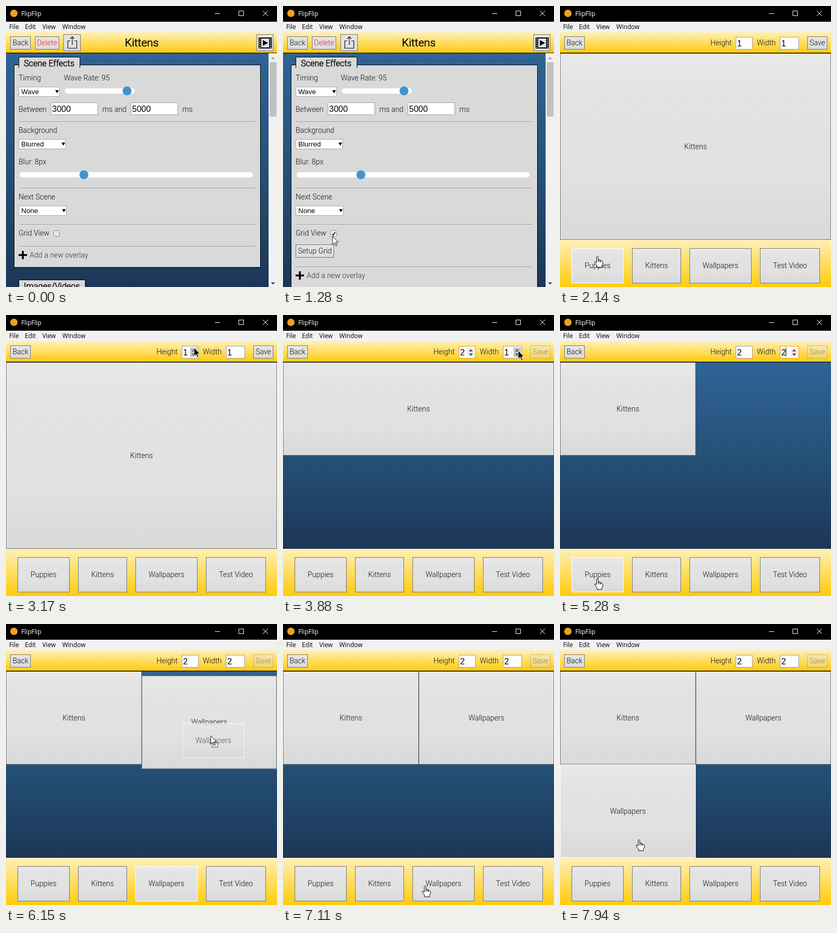
Recreate the animation shown at these times as an HTML page. Size 515 px wide and 536 px high, loop 7.99 s.

```html
<!DOCTYPE html>
<html lang="en">
<head>
<meta charset="utf-8">
<title>FlipFlip</title>
<style>
html, body { margin: 0; width: 100%; height: 100%; overflow: hidden; }
svg { display: block; width: 515px; height: 536px; }
text { font: 300 14px Roboto, sans-serif; white-space: pre; }
.mid { text-anchor: middle; }
.win { font: 11.7px "Open Sans", sans-serif; }
.field { font: 16px "Liberation Sans", sans-serif; }
.select { font: 13.33px "Liberation Sans", sans-serif; }
.tab { font-size: 16px; stroke: #000; stroke-width: .5px; }
.title { font-size: 20.8px; stroke: #000; stroke-width: .6px; }
</style>
</head>
<body>
<svg viewBox="0 0 515 536">
  <defs>
    <linearGradient id="gold" x2="0" y2="1"><stop stop-color="#fff0b8"/><stop offset="1" stop-color="#ffcb0c"/></linearGradient>
    <linearGradient id="blue" x2="0" y2="1"><stop stop-color="#306396"/><stop offset=".5" stop-color="#255177"/><stop offset="1" stop-color="#1c3657"/></linearGradient>
    <linearGradient id="gray" x2="0" y2="1"><stop stop-color="#e9e9e9"/><stop offset=".2" stop-color="#e3e3e3"/><stop offset=".68" stop-color="#e1e1e1"/><stop offset=".85" stop-color="#dcdcdc"/><stop offset="1" stop-color="#dadada"/></linearGradient>
  </defs>
  <g id="view"></g>
</svg>
<script>
const LOOP = 7990;
const SETUP = [24, 455, 73, 25];
const BUTTONS = [["Puppies", 22, 99], ["Kittens", 137, 93], ["Wallpapers", 246, 118], ["Test Video", 380, 114]]
  .map(([name, x, w]) => ({ name, box: [x, 462, w, 67] }));

// Pointer path: time, x, y
const PATH = [
  [430, 122, 510], [800, 99, 420], [1090, 94, 439], [1650, 94, 439], [1830, 71, 477],
  [2300, 71, 477], [3050, 358, 60], [3110, 358, 60], [3230, 357, 65], [3410, 357, 65],
  [3820, 447, 68], [4180, 447, 68], [4930, 150, 495], [5200, 71, 502], [5340, 71, 502],
  [5740, 300, 486], [5810, 300, 486], [6150, 389, 213], [6290, 390, 210], [6650, 390, 210],
  [6820, 270, 499], [7170, 270, 499], [7570, 150, 411], [LOOP, 150, 411]
];

const rect = (x, y, w, h, fill, more = "") => `<rect x="${x}" y="${y}" width="${w}" height="${h}" fill="${fill}" ${more}/>`;
const frame = (x, y, w, h, fill, line) => rect(x + .5, y + .5, w - 1, h - 1, fill, `stroke="${line}"`);
const text = (s, x, y, cls = "", fill = "#111") => `<text x="${x}" y="${y}" class="${cls}" fill="${fill}">${s}</text>`;
const path = (d, more) => `<path d="${d}" ${more}/>`;
const at = (x, y, s, more = "") => `<g transform="translate(${x} ${y})" ${more}>${s}</g>`;
const button = (s, [x, y, w, h], hot, fill) =>
  frame(x, y, w, h, "url(#gray)", hot ? "#fff" : "#777") + text(s, x + w / 2, y + h / 2 + 4.7, "mid", fill);
const inside = ([x, y, w, h], p) => p.x >= x && p.x < x + w && p.y >= y && p.y < y + h;

function pointer(t) {
  const i = PATH.findIndex(k => k[0] > t);
  if (i < 1) return { x: -99, y: -99 };
  const [t0, x0, y0] = PATH[i - 1], [t1, x1, y1] = PATH[i];
  const u = (t - t0) / (t1 - t0), e = u * u * (3 - 2 * u);
  return { x: x0 + (x1 - x0) * e, y: y0 + (y1 - y0) * e };
}

function hand() {
  return path("M-1.5 1.5Q0-1 1.5 1.5V6.5L4 7V8L6.5 8V9L9 9.5 10.5 11V15L8.5 18.5V21.5H-.5V19L-5 13Q-5.5 10-3 11L-1.5 12.5Z",
    'fill="#fff" stroke="#000" stroke-linejoin="round"') + path("M1.5 7v4M4 8v3.500M6.500 9v3", 'stroke="#000"');
}

function arrow(fill, line) {
  return path("M0 0V16L3.7 12.5 6.3 18.5 8.6 17.5 6 11.7H11Z", `fill="${fill}" stroke="${line}" stroke-width=".9"`);
}

function chrome() {
  return rect(0, 0, 515, 30, "#000") + '<circle cx="15" cy="14" r="7" fill="#f0a020"/>' +
    text("FlipFlip", 29, 19, "win", "#fff") +
    path("M397 14.500H407M442.500 9.500H451.500V18.500H442.500ZM488 9L498 19M498 9L488 19", 'fill="none" stroke="#fff"') +
    rect(0, 30, 515, 20, "#f1f1f1") +
    [["File", 6], ["Edit", 36], ["View", 69], ["Window", 107]].map(([s, x]) => text(s, x, 44, "win", "#000")).join("") +
    rect(0, 50, 515, 39, "url(#gold)") + rect(0, 89, 515, 1.3, "#111") + button("Back", [8, 58, 39, 25]);
}

function select(s, y, w) {
  return frame(24, y, w, 19, "#fff", "#a9a9a9") + text(s, 29, y + 14, "select", "#000") +
    path(`M${16 + w - 0.5} ${y + 6.5}h7l-3.500 6z`, 'fill="#000"');
}

function slider(x, y, w, thumb) {
  return rect(x, y - 5, w, 10, "#fff", 'rx="5"') + `<circle cx="${thumb}" cy="${y}" r="8.5" fill="#3e95d2"/>`;
}

function input(s, x, y, w, h, focus) {
  return frame(x, y, w, h, "#fff", focus ? "#e59a20" : "#a0a0a0") + text(s, x + 2.5, y + h / 2 + 5.5, "field", "#000");
}

const rule = y => rect(24, y, 450, 1, "#9a9a9a") + rect(24, y + 1, 450, 1, "#e4e4e4");
const tab = (s, y, w) => path(`M24.500 ${y + 21}V${y + .5}H${24 + w - .5}V${y + 21}`, 'fill="#d9d9d9" stroke="#000"') +
  text(s, 34, y + 18, "tab", "#000");

function sceneView(t, p) {
  const on = t >= 1280, dy = on ? 39 : 0;
  let s = rect(0, 90, 515, 446, "url(#blue)") + chrome();
  s += button("Delete", [55, 58, 46, 25], false, "#e8202a") + text("Kittens", 258, 77, "mid title", "#000");
  s += frame(109, 54, 33, 32, "url(#gray)", "#777") +
    path("M122 66.500H117.500V80.500H134.500V66.500H130M126 74V58.500M122 62.500L126 58.500 130 62.500", 'fill="none" stroke="#111" stroke-width="1.2"');
  s += frame(476, 54, 32, 32, "url(#gray)", "#777") + rect(480, 60, 25, 21, "#000") + rect(485, 62, 15, 17, "#e2e2e2") +
    path("M488 65V76L498 70.500Z", 'fill="#000"');
  for (let y = 62; y < 80; y += 4) s += rect(481.5, y, 2, 2, "#e2e2e2") + rect(501.5, y, 2, 2, "#e2e2e2");

  s += frame(15, 112, 469, 387 + dy, "#d9d9d9", "#000") + tab("Scene Effects", 97, 117);
  s += text("Timing", 24, 142) + text("Wave Rate: 95", 110, 142) + select("Wave", 154, 78) + slider(112, 162, 133, 230);
  s += text("Between", 24, 202) + input("3000", 85, 184, 90, 24) + text("ms and", 183, 202) +
    input("5000", 237, 184, 90, 24) + text("ms", 335, 202) + rule(220);
  s += text("Background", 24, 242) + select("Blurred", 254, 90) + text("Blur: 8px", 24, 302) + slider(26, 322, 443, 148) + rule(347);
  s += text("Next Scene", 24, 369) + select("None", 381, 91) + rule(416);
  s += text("Grid View", 24, 438) + rect(90.5, 428.5, 11, 11, on ? "#fff" : "#e6e6e6", 'rx="2" stroke="#888"');
  if (on) s += path("M93 434.500L95.500 437 99.500 431", 'fill="none" stroke="#222" stroke-width="1.8"') +
    button("Setup Grid", SETUP, inside(SETUP, p));
  s += at(0, dy, rule(458) + path("M32 467V483M24 475H40", 'stroke="#000" stroke-width="3.4"') +
    text("Add a new overlay", 45, 480, "", "#333") + tab("Images/Videos", 522, 127));
  s += rect(499, 90, 16, 446, "#f1f1f1") + rect(501, 107, 13, 104, "#c1c1c1") +
    path("M503.500 101.500h8l-4-4.500z", 'fill="#a3a3a3"') + path("M503.500 527h8l-4 4.500z", 'fill="#505050"');
  return s;
}

function spinner(x, hot) {
  return rect(x, 62, 14, 18, hot ? "#c4c4c4" : "#f0f0f0") +
    path(`M${x + 3} 69.500h8l-4-4.500zM${x + 3} 73.500h8l-4 4.500z`, 'fill="#505050"');
}

function cellsAt(t) {
  const rows = t < 3410 ? 1 : 2, cols = t < 3940 ? 1 : 2;
  const w = cols > 1 ? 258 : 515, h = 356 / rows;
  const items = [["Kittens", -1e4], ["Wallpapers", 6020], ["Wallpapers", 7386]].filter(c => t >= c[1]);
  const cells = items.map(([name, born], i) => {
    const x = i % 2 * 258, y = 90 + (i >> 1) * h;
    const rest = (1 - Math.min(1, (t - born) / 183)) ** 3;   // slides in from the button
    return { name, box: [x + (246 - x) * rest, y + (462 - y) * rest, x ? 257 : w, h] };
  });
  return { rows, cols, cells };
}

function gridView(t, p, drag, hover) {
  const { rows, cols, cells } = cellsAt(t);
  let s = rect(0, 90, 515, 356, "url(#blue)");
  for (const c of cells) s += button(c.name, c.box, hover === c.name + c.box);
  s += chrome() + rect(0, 446, 515, 90, "url(#gold)");
  for (const b of BUTTONS) s += button(b.name, b.box, hover === b.name + b.box);

  const onHeight = t >= 3410 && t < 3940, onWidth = t >= 3940 && t < 5810;
  s += text("Height", 286, 75) + input(rows, 334, 59, 32, 24, onHeight);
  s += text("Width", 374, 75) + input(cols, 418, 59, 36, 24, onWidth);
  const overH = inside([334, 59, 32, 24], p), overW = inside([418, 59, 36, 24], p);
  if (overH || onHeight) s += spinner(350, overH);
  if (overW || onWidth) s += spinner(438, overW);
  if (onWidth && t >= 4000 && Math.floor((t - 4000) / 530) % 2 === 0) s += rect(429, 62, 1, 17, "#000");
  s += at(0, 0, button("Save", [470, 58, 38, 25]), cells.length < rows * cols ? 'opacity=".4"' : "");
  if (drag) s += at(0, 0, button("Wallpapers", [p.x - drag.x, p.y - drag.y, 118, 67], true, "#333"), 'opacity=".78"');
  return s;
}

function draw(t) {
  const p = pointer(t), scene = t < 2140;
  const drag = t >= 5810 && t < 6650 ? { x: 54, y: 24 } : t >= 7170 && t < 7880 ? { x: 24, y: 37 } : null;
  let hover = "", link = scene && t >= 1280 && inside(SETUP, p);
  if (!scene) {
    const hit = drag ? null : [...BUTTONS, ...cellsAt(t).cells].find(b => inside(b.box, p));
    link = !!hit;
    if (hit && !(t >= 7010 && t < 7880)) hover = hit.name + hit.box;
    if (drag && t < 6650) hover = BUTTONS[2].name + BUTTONS[2].box;
  }
  let cursor = link ? hand() : p.y < 90 ? arrow("#000", "#fff") : arrow("#fff", "#000");
  if (drag) cursor += rect(2.5, 13.5, 11, 9, "none", 'stroke="#000" stroke-dasharray="1 1"');
  view.innerHTML = (scene ? sceneView(t, p) : gridView(t, p, drag, hover)) + at(p.x, p.y, cursor);
}

const view = document.getElementById("view");
const start = performance.now();
function tick() {
  draw((performance.now() - start) % LOOP);
  requestAnimationFrame(tick);
}
tick();
</script>
</body>
</html>
```
